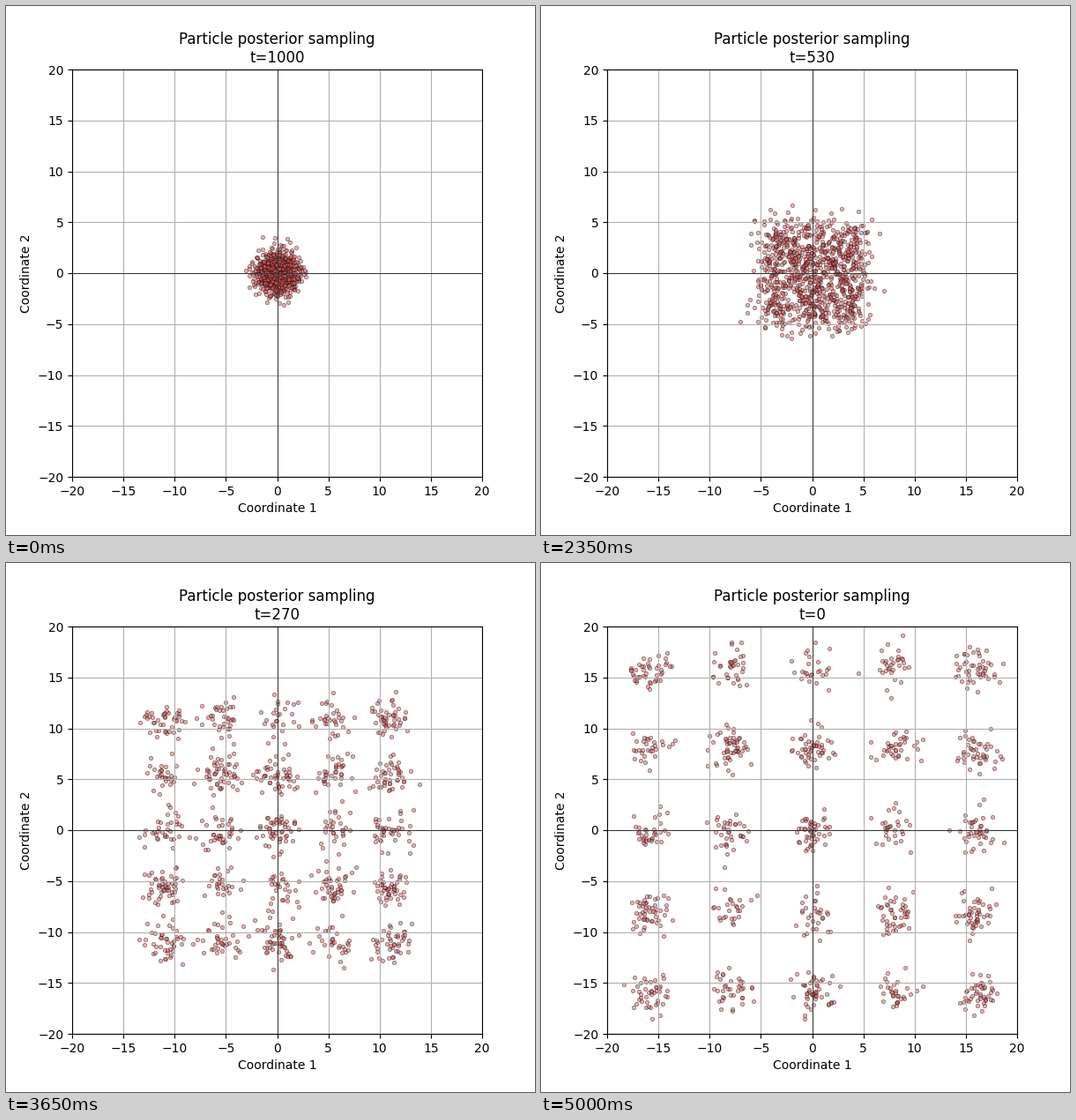
Write a matplotlib script that moves like this. It is 600 px wide and 600 px high and loops after 5.05 s.

```python
import numpy as np
import matplotlib.pyplot as plt
from matplotlib.animation import FuncAnimation

FRAMES = 101
STEP = 10          # diffusion steps per frame
INTERVAL = 50      # ms
SPACING = 8        # distance between mixture modes

# Particles per mode, top row first
COUNTS = np.array([
    [44, 35, 25, 32, 48],
    [31, 53, 50, 37, 45],
    [34, 37, 49, 29, 41],
    [52, 27, 31, 45, 48],
    [44, 37, 49, 31, 46],
])


def log_alpha(t):
    """Log of the cumulative signal power for a linear noise schedule."""
    return -(1e-4 * t + 0.0199 * t**2 / 2000)


def sample_modes():
    rows, cols = np.indices(COUNTS.shape)
    centers = np.stack([cols - 2, 2 - rows], axis=-1).reshape(-1, 2) * SPACING
    return np.repeat(centers, COUNTS.ravel(), axis=0)


def simulate(rng):
    """Noise the mixture step by step, then reverse the path in time."""
    modes = sample_modes()
    modes = modes[rng.permutation(len(modes))]
    x = modes + rng.standard_normal(modes.shape)
    path = [x]
    for k in range(1, FRAMES):
        keep = np.exp(log_alpha(k * STEP) - log_alpha((k - 1) * STEP))
        x = np.sqrt(keep) * x + np.sqrt(1 - keep) * rng.standard_normal(x.shape)
        path.append(x)
    return path[::-1]


path = simulate(np.random.default_rng(7))

fig, ax = plt.subplots(figsize=(6, 6), dpi=100)
dots = ax.scatter(*path[0].T, s=10, c="#e05c5c", alpha=0.5,
                  edgecolors="black", linewidths=0.5)
ax.axhline(0, color="black", linewidth=0.5)
ax.axvline(0, color="black", linewidth=0.5)
ax.set_xlim(-20, 20)
ax.set_ylim(-20, 20)
ax.set_xlabel("Coordinate 1")
ax.set_ylabel("Coordinate 2")
ax.grid(True)
title = ax.set_title("")


def update(i):
    dots.set_offsets(path[i])
    title.set_text(f"Particle posterior sampling\nt={(FRAMES - 1 - i) * STEP}")
    return dots, title


anim = FuncAnimation(fig, update, frames=FRAMES, interval=INTERVAL,
                     repeat=True, repeat_delay=0)
plt.show()
```
